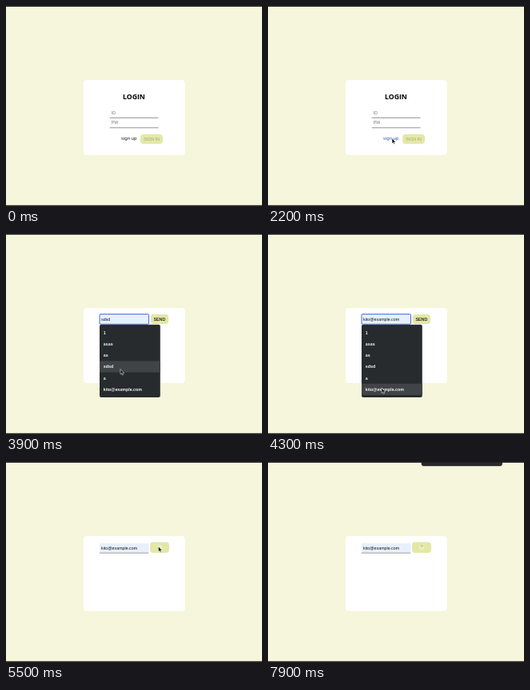
Recreate the animation shown at these times as an HTML page. Size 320 by 251 pixels, loop 8 s.

```html
<!DOCTYPE html>
<html lang="en">
<head>
<meta charset="utf-8">
<title>Login</title>
<style>
html, body { margin: 0; width: 100%; height: 100%; overflow: hidden; background: #f6f6dc; }
svg { display: block; width: 100%; height: 100%; }
text { font-family: "Liberation Sans", Arial, sans-serif; font-size: 5.3px; white-space: pre; }
.title { font: 700 8.7px "Open Sans", sans-serif; }
.link { font: 5.65px "Noto Sans", sans-serif; }
.hint { fill: #747474; font-size: 5.2px; }
.menu text { fill: #f4f4f4; font-weight: 700; }
</style>
</head>
<body>
<svg viewBox="0 0 320 251">
  <rect width="320" height="251" fill="#f6f6dc"/>
  <rect x="97" y="93" width="126.7" height="94" rx="4" fill="#fff"/>

  <g id="login">
    <text class="title" x="160" y="116.6" text-anchor="middle">LOGIN</text>
    <text class="hint" x="131.8" y="135.9">ID</text>
    <text class="hint" x="131.8" y="148.3">PW</text>
    <path d="M129.7 140.3H190.5M129.7 152.8H190.5" stroke="#777" stroke-width=".8"/>
    <rect id="ring" x="129" y="127.6" width="62.2" height="12.8" rx="1" fill="none" stroke="#3a6fd8"/>
    <text id="link" class="link" x="144" y="168.4">sign up</text>
    <rect x="168" y="161" width="28" height="12" rx="4" fill="#e4e8a8"/>
    <text x="182" y="168.9" text-anchor="middle" fill="#a3a67c">SIGN IN</text>
  </g>

  <g id="auth">
    <rect id="field" x="117" width="61.5"/>
    <path id="line" d="M117 114.2H178.3" stroke="#888" stroke-width=".8"/>
    <text id="value" x="119"></text>
    <path id="caret" stroke="#222" stroke-width=".6"/>
    <rect id="send" fill="#e3e8a6"/>
    <text id="label" x="191.9" y="108.6" text-anchor="middle" fill="#111" stroke="#111" stroke-width=".12">SEND</text>
    <g id="spin" fill="none" stroke-width="1">
      <circle r="2.3" stroke="#f5f6e2"/>
      <path d="M0-2.3A2.3 2.3 0 0 1 2.3 0" stroke="#b9bd85"/>
    </g>
  </g>

  <g id="menu" class="menu">
    <rect x="117" y="113.8" width="75.8" height="91.2" rx="2" fill="#272b2d"/>
    <rect id="hover" x="117" width="75.8" height="14.2" fill="#414446"/>
  </g>

  <g id="toast">
    <rect x="191.3" y="-30" width="102" height="35.8" rx="3.5" fill="#c9c9bb"/>
    <rect x="191.8" y="-30" width="101" height="35" rx="3" fill="#29292b"/>
  </g>
  <path d="M0 .4H320M0 250.4H320" stroke="#222" stroke-width="1"/>

  <g id="mouse">
    <path id="arrow" d="M0 0V6.6L1.5 5.3 2.5 7.6 3.6 7.1 2.6 4.9H4.6Z" fill="#111" stroke="#fff" stroke-width=".5"/>
    <path id="beam" d="M-1.7-3.5Q0-3.5 0-2.5V2.5Q0 3.5-1.7 3.5M1.7-3.5Q0-3.5 0-2.5V2.5Q0 3.5 1.7 3.5" fill="none" stroke="#444" stroke-width=".7"/>
  </g>
</svg>
<script>
const LOOP = 8000, ROW = 14.2, ROW_TOP = 117;
const MAIL = "kito@example.com";
const items = ["1", "asas", "as", "sdsd", "a", MAIL];
const $ = id => document.getElementById(id);
const set = (id, attrs) => {
  for (const k in attrs) $(id).setAttribute(k, attrs[k]);
};
const show = (id, on) => set(id, { visibility: on ? "visible" : "hidden" });
const clamp = v => Math.max(0, Math.min(1, v));
const ease = v => v * v * (3 - 2 * v);

// Pointer stops: time, x, y
const stops = [
  [0, 161, 256], [100, 160, 242], [350, 150, 113], [600, 155, 163],
  [1000, 155, 163], [1100, 155, 166], [2300, 155, 166], [2700, 148, 112],
  [3100, 146, 100.5], [3400, 146, 100.5], [3900, 143, 169.5], [4300, 142, 193],
  [4600, 142, 193], [5000, 200, 112], [5250, 190.5, 106], [5500, 190.5, 106],
  [6300, 243, 18], [7200, 245, 6.5], [7450, 246, -10], [LOOP, 246, -10]
];

function pointerAt(t) {
  const i = stops.findIndex(s => s[0] > t);
  const [t0, x0, y0] = stops[i - 1], [t1, x1, y1] = stops[i];
  const k = ease((t - t0) / (t1 - t0));
  return [x0 + (x1 - x0) * k, y0 + (y1 - y0) * k];
}

items.forEach((name, i) => {
  const label = document.createElementNS("http://www.w3.org/2000/svg", "text");
  label.setAttribute("x", 121.8);
  label.setAttribute("y", ROW_TOP + ROW * i + 8.8);
  label.textContent = name;
  $("menu").append(label);
});

function drawLogin(t) {
  const on = t < 2400;
  set("login", { display: on ? "inline" : "none" });
  set("ring", { opacity: t < 1850 ? clamp((t - 1300) / 200) * (t >= 1400) : 0 });
  set("link", { fill: t >= 1850 ? "#2a50b8" : "#111" });
}

function drawAuth(t, y) {
  set("auth", { display: t >= 2400 ? "inline" : "none" });
  const focus = t >= 2800 && t < 5300, busy = t >= 5300;
  const open = t >= 3000 && t < 4600;
  const row = open && t >= 3500 ? Math.floor((y + 1 - ROW_TOP) / ROW) : -1;
  const text = t >= 4600 ? MAIL : items[row] || "";

  set("field", {
    y: focus ? 100.6 : 102, height: focus ? 12.6 : 12, rx: focus ? 1 : 0,
    fill: text ? "#e8f0fe" : "#fff", stroke: focus ? "#3b6fd2" : "none"
  });
  show("line", !focus);
  set("value", { y: focus ? 108.6 : 109.6, fill: text ? "#111" : "#757575" });
  $("value").textContent = text || "EMAIL FOR AUTH";
  const end = text ? 119.4 + $("value").getComputedTextLength() : 119.3;
  set("caret", { d: `M${end} 103.8V110` });
  set("caret", { opacity: focus && (!text || t >= 4600) ? 1 : 0 });

  set("send", busy
    ? { x: 180, y: 100.6, width: 24, height: 13.4, rx: 4 }
    : { x: 180.8, y: 100.8, width: 22.4, height: 12.2, rx: 4 });
  set("label", { opacity: busy ? 0 : 1 });
  set("spin", { opacity: busy ? 1 : 0, transform: `translate(192 107.2) rotate(${t * 0.36})` });

  show("menu", open);
  set("hover", { y: ROW_TOP + ROW * row - 0.2, opacity: row >= 0 ? 1 : 0 });
}

function draw(t) {
  const [x, y] = pointerAt(t);
  drawLogin(t);
  drawAuth(t, y);
  set("toast", { transform: `translate(0 ${-8 * (1 - ease(clamp((t - 7600) / 300)))})` });
  const beam = t >= 2700 && t < 3600 && y < 114;
  set("mouse", { transform: `translate(${x} ${y})` });
  show("arrow", !beam);
  show("beam", beam);
}

function frame(now) {
  draw(now % LOOP);
  requestAnimationFrame(frame);
}
draw(0);
requestAnimationFrame(frame);
</script>
</body>
</html>
```
